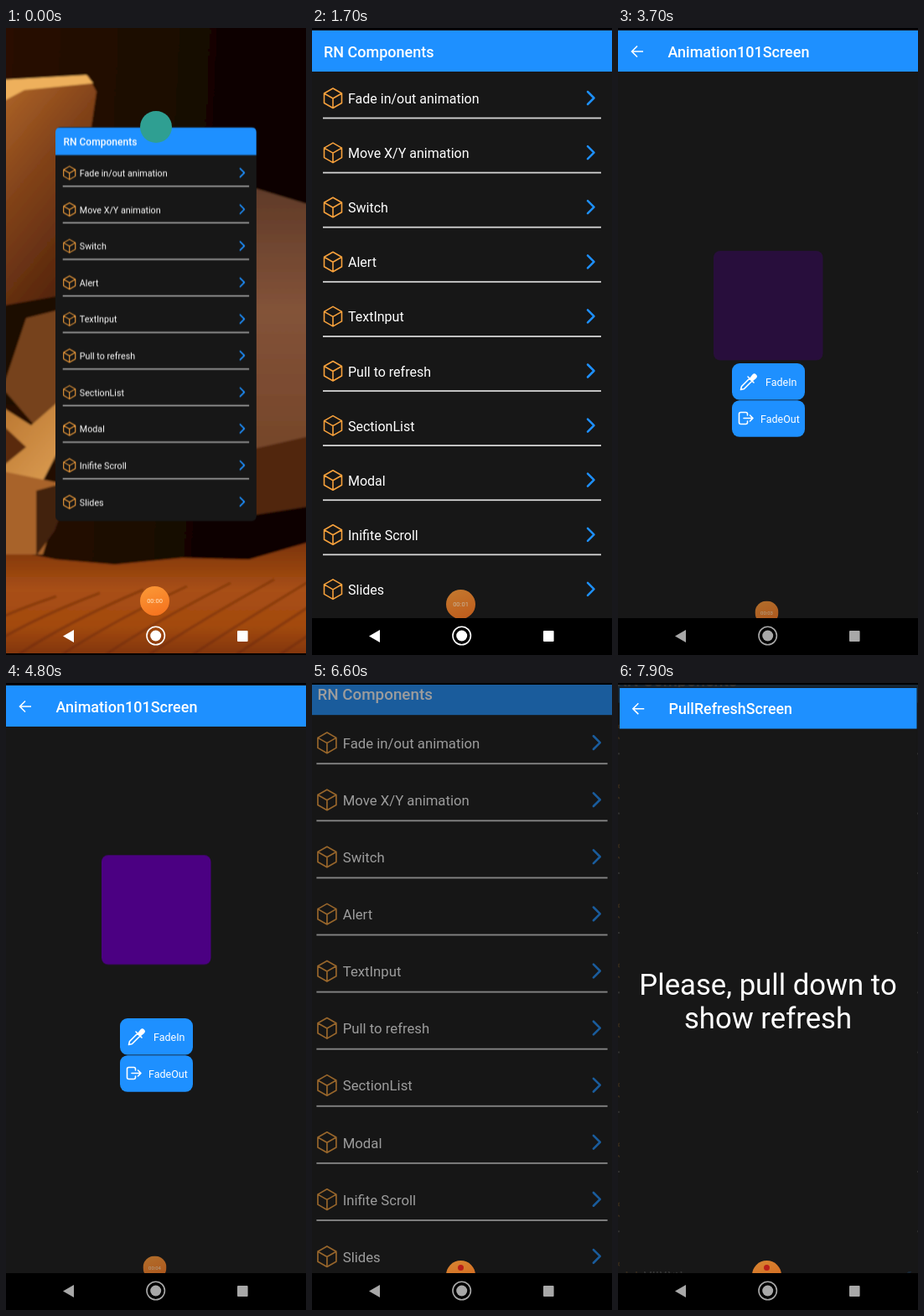
These frames come from a looping animation (358 px wide and 748 px high, 8000 ms). An HTML page:

```html
<!DOCTYPE html>
<html lang="en">
<head>
<meta charset="utf-8">
<title>RN Components</title>
<style>
@property --sec { syntax: "<integer>"; inherits: true; initial-value: 0; }
:root { --out: cubic-bezier(.33, .67, .67, 1); }
html, body { margin: 0; width: 100%; height: 100%; overflow: hidden; background: #000; }
svg { position: absolute; left: 0; top: 0; width: 358px; height: 748px; }
text { font: 16px Roboto, sans-serif; fill: #fff; }
.title { font-weight: 500; font-size: 18px; }
.label { font-size: 12.5px; }
.big { font-size: 35px; text-anchor: middle; }
.line { fill: none; stroke: #fff; stroke-width: 1.6; stroke-linecap: round; stroke-linejoin: round; }
.blue { fill: #1e90ff; }
.dark { fill: #171717; }

#wall { animation: wall 8s linear infinite; }
#badge { animation: badge 8s linear infinite; }
#app { animation: open 8s var(--out) infinite; }
#corner { animation: corner 8s linear infinite; }
#list, #fade, #pull { transform-origin: 179px 353px; }
#list { animation: list 8s var(--out) infinite; }
#fade { animation: fadeScale 8s var(--out) infinite, fadeShow 8s linear infinite; }
#pull { animation: pullScale 8s var(--out) infinite, pullShow 8s linear infinite; }
#box { animation: boxShow 8s linear infinite, boxFall 8s linear infinite; }
#navBack { animation: navBack 8s linear infinite; }
#keys { animation: keys 8s linear infinite; }

.widget {
  position: absolute; left: 159.5px; width: 35px; height: 35px; border-radius: 50%;
  background: linear-gradient(160deg, #fb9a38, #f5701c);
}
#clock {
  top: 665.5px; counter-reset: sec var(--sec);
  animation: tick 8s steps(8) infinite, clock 8s linear infinite;
}
#clock::after {
  content: "00:0" counter(sec); display: block; text-align: center;
  font: 7.5px/35px Roboto, sans-serif; color: #ffe9c8;
}
#idle { top: 688.5px; animation: idle 8s step-end infinite; }
#idle::after {
  content: ""; position: absolute; left: 14px; top: 5px; width: 7px; height: 7px;
  border-radius: 50%; background: #d8201a;
}

@keyframes wall { 0%, 12.5% { opacity: 1; } 16.875%, 100% { opacity: 0; } }
@keyframes badge { 0%, 12.5% { opacity: 1; } 14.4%, 100% { opacity: 0; } }
@keyframes open {
  0%, 12.5% { transform: translate(59px, 116.7px) scale(.67); }
  16.875%, 100% { transform: none; }
}
@keyframes corner { 0%, 12.5% { rx: 9px; } 16.875%, 100% { rx: 0px; } }
@keyframes list {
  0%, 35%, 85.0625%, 94.775% { transform: scale(1); opacity: 1; }
  40%, 81.3125%, 100% { transform: scale(1.1); opacity: .08; }
}
@keyframes fadeScale {
  0%, 35% { transform: scale(.85); }
  40%, 81.3125% { transform: scale(1); }
  85.0625%, 100% { transform: scale(.925); }
}
@keyframes fadeShow { 0%, 36.4%, 82.5%, 100% { opacity: 0; } 38.3%, 81.5625% { opacity: 1; } }
@keyframes pullScale { 0%, 94.775% { transform: scale(.85); } 100% { transform: scale(1); } }
@keyframes pullShow { 0%, 96.2% { opacity: 0; } 98.1%, 100% { opacity: 1; } }
@keyframes boxShow { 0%, 44.025%, 72.5%, 100% { opacity: 0; } 50.275%, 68.75% { opacity: 1; } }
/* two drops, each with three shrinking bounces */
@keyframes boxFall {
  0%, 44.024%, 50.275%, 58.637%, 64.888%, 100% { transform: translateY(0); }
  44.025%, 58.638% { transform: translateY(-100px); animation-timing-function: cubic-bezier(.33, 0, .67, .33); }
  46.298%, 48.57%, 49.707%, 60.911%, 63.183%, 64.32% {
    transform: translateY(0); animation-timing-function: cubic-bezier(.33, .67, .67, 1);
  }
  47.434%, 62.047% { transform: translateY(-25px); animation-timing-function: cubic-bezier(.33, 0, .67, .33); }
  49.139%, 63.752% { transform: translateY(-6.25px); animation-timing-function: cubic-bezier(.33, 0, .67, .33); }
  49.991%, 64.604% { transform: translateY(-1.56px); animation-timing-function: cubic-bezier(.33, 0, .67, .33); }
}
@keyframes tick { from { --sec: 0; } to { --sec: 8; } }
@keyframes clock {
  0%, 12.5% { transform: none; opacity: 1; }
  16.875%, 27.5% { transform: translateY(4px); opacity: .76; }
  31.25%, 71.249% { transform: translateY(14px) scale(.8); opacity: .68; }
  71.25%, 100% { transform: translateY(14px) scale(.8); opacity: 0; }
}
@keyframes idle { 0% { opacity: 0; } 71.25%, 100% { opacity: .85; } }
@keyframes navBack { 0%, 12.5% { opacity: 0; } 16.875%, 100% { opacity: 1; } }
@keyframes keys { 0%, 28.75% { opacity: 1; } 31.25%, 100% { opacity: .66; } }
</style>
</head>
<body>
<svg viewBox="0 0 358 748">
  <defs>
    <clipPath id="card"><rect id="corner" y="2" width="358" height="702"/></clipPath>
    <filter id="soft" x="-5%" y="-5%" width="110%" height="110%"><feGaussianBlur stdDeviation="1.3"/></filter>
    <linearGradient id="night" x2="1" y2=".1">
      <stop stop-color="#2a1006"/><stop offset=".55" stop-color="#1b0a04"/><stop offset=".8" stop-color="#0a0302"/>
    </linearGradient>
    <linearGradient id="wood" x2="0" y2="1">
      <stop stop-color="#7a330b"/><stop offset=".4" stop-color="#a84f14"/>
      <stop offset=".7" stop-color="#a34a10"/><stop offset="1" stop-color="#7a3008"/>
    </linearGradient>
    <linearGradient id="tan" x2="0" y2="1">
      <stop stop-color="#5f3a28"/><stop offset=".45" stop-color="#835339"/><stop offset="1" stop-color="#744428"/>
    </linearGradient>
    <linearGradient id="face" x2=".5" y2="1">
      <stop stop-color="#b4692a"/><stop offset=".45" stop-color="#84441a"/><stop offset="1" stop-color="#54240c"/>
    </linearGradient>
    <linearGradient id="lit" x2="1" y2="1">
      <stop stop-color="#b9752f"/><stop offset="1" stop-color="#e0a257"/>
    </linearGradient>
  </defs>
  <g id="wall">
    <g filter="url(#soft)">
      <rect x="-8" y="-8" width="374" height="764" fill="url(#night)"/>
      <path d="M60 188L300 192 366 212V520H60z" fill="url(#tan)"/>
      <path d="M270 508L366 486V570L290 582z" fill="#512611"/>
      <path d="M-8 620L60 634 130 640 210 632 290 634 366 612V756H-8z" fill="url(#wood)"/>
      <g id="grain" fill="none" stroke="#6a2908" stroke-width="3" opacity=".5"></g>
      <path d="M-8 66L98 57 108 76 72 322-8 334z" fill="url(#face)"/>
      <path d="M-8 62L96 56 104 66 22 74-8 90z" fill="#eeb05c"/>
      <path d="M-8 332L72 318V450H-8z" fill="#1c0904"/>
      <path d="M24 346L80 332V430L34 474-4 430z" fill="#76431c"/>
      <path d="M-8 450L30 474 62 446 80 470 40 548-8 530z" fill="url(#lit)"/>
      <path d="M-8 470L24 500-8 526z" fill="#5a2a0e"/>
      <path d="M-8 528L70 544 44 628-8 628z" fill="#a8642c"/>
      <path d="M36 552L80 540 58 600 36 630z" fill="#42200c"/>
    </g>
    <path d="M0 746H358V748H0z"/>
  </g>
  <g id="app"><g clip-path="url(#card)">
    <rect class="dark" y="2" width="358" height="702"/>
    <g id="list"></g>
    <g id="fade">
      <rect id="box" x="114" y="269" width="130.5" height="130.5" rx="8" fill="#4b0082"/>
      <rect class="blue" x="136" y="400" width="87" height="43.6" rx="9"/>
      <rect class="blue" x="136" y="444.2" width="87" height="43.6" rx="9"/>
      <path class="line" d="M146.500 431.500l1-4 9.500-9.500 3 3-9.500 9.500zM155 416l7 7"/>
      <path class="line" style="fill:#fff" d="M157.500 418.500l3.500-4.500a2.300 2.300 0 0 1 3.300 3.300l-4.300 3.700z"/>
      <path class="line" d="M154.500 462v-1.500a2 2 0 0 0-2-2h-6a2 2 0 0 0-2 2v10a2 2 0 0 0 2 2h6a2 2 0 0 0 2-2V469M150 465.500h11M157.500 462l3.500 3.500-3.500 3.500"/>
      <text class="label" x="176" y="427">FadeIn</text>
      <text class="label" x="170" y="471">FadeOut</text>
    </g>
    <g id="pull">
      <text class="big" x="179" y="372">Please, pull down to</text>
      <text class="big" x="179" y="413">show refresh</text>
    </g>
  </g></g>
  <circle id="badge" cx="179" cy="118" r="19" fill="#2f9f92"/>
</svg>
<div id="clock" class="widget"></div>
<div id="idle" class="widget"></div>
<svg viewBox="0 0 358 748">
  <path id="navBack" d="M0 704H358V748H0z"/>
  <g id="keys" fill="#fff">
    <path d="M68 725.500L81 718V733z"/>
    <circle cx="178.700" cy="725" r="6.500"/>
    <circle cx="178.700" cy="725" r="10.700" fill="none" stroke="#fff" stroke-width="1.600"/>
    <rect x="276" y="719" width="12.600" height="13" rx="1"/>
  </g>
</svg>
<script>
const items = ["Fade in/out animation", "Move X/Y animation", "Switch", "Alert", "TextInput",
  "Pull to refresh", "SectionList", "Modal", "Inifite Scroll", "Slides"];

const header = (title, x) =>
  `<rect class="blue" y="3" width="358" height="49"/><text class="title" x="${x}" y="34.5">${title}</text>`;

const row = (name, i) => `<g transform="translate(0 ${i * 65.1})">
  <path class="line" style="stroke:#f7a13c" d="M25 72l10.500 6v11.500l-10.500 6-10.500-6V78zM14.500 78L25 84l10.500-6M25 84v11.500"/>
  <text x="43" y="90">${name}</text>
  <path class="line" style="stroke:#1e90ff;stroke-width:2.5" d="M329 76l7.500 7.500-7.500 7.500"/>
  ${i < items.length - 1 ? '<rect x="13" y="106.600" width="332" height="1.800" fill="#d4d4d4"/>' : ""}</g>`;

const add = (id, html) => document.getElementById(id).insertAdjacentHTML("afterbegin", html);
const back = '<path class="line" style="stroke-linecap:butt;stroke-linejoin:miter" d="M30 28H17M23 21.500L16.500 28l6.500 6.500"/>';
const page = '<rect class="dark" y="2" width="358" height="702"/>';
const grain = Array.from({ length: 9 }, (_, i) => `<path d="M${i * 52 - 90} 748q60-40 150-${70 + i * 4}"/>`);

add("grain", grain.join(""));
add("list", page + header("RN Components", 14) + items.map(row).join(""));
add("fade", page + header("Animation101Screen", 59.5) + back);
add("pull", page + header("PullRefreshScreen", 59.5) + back);
</script>
</body>
</html>
```
